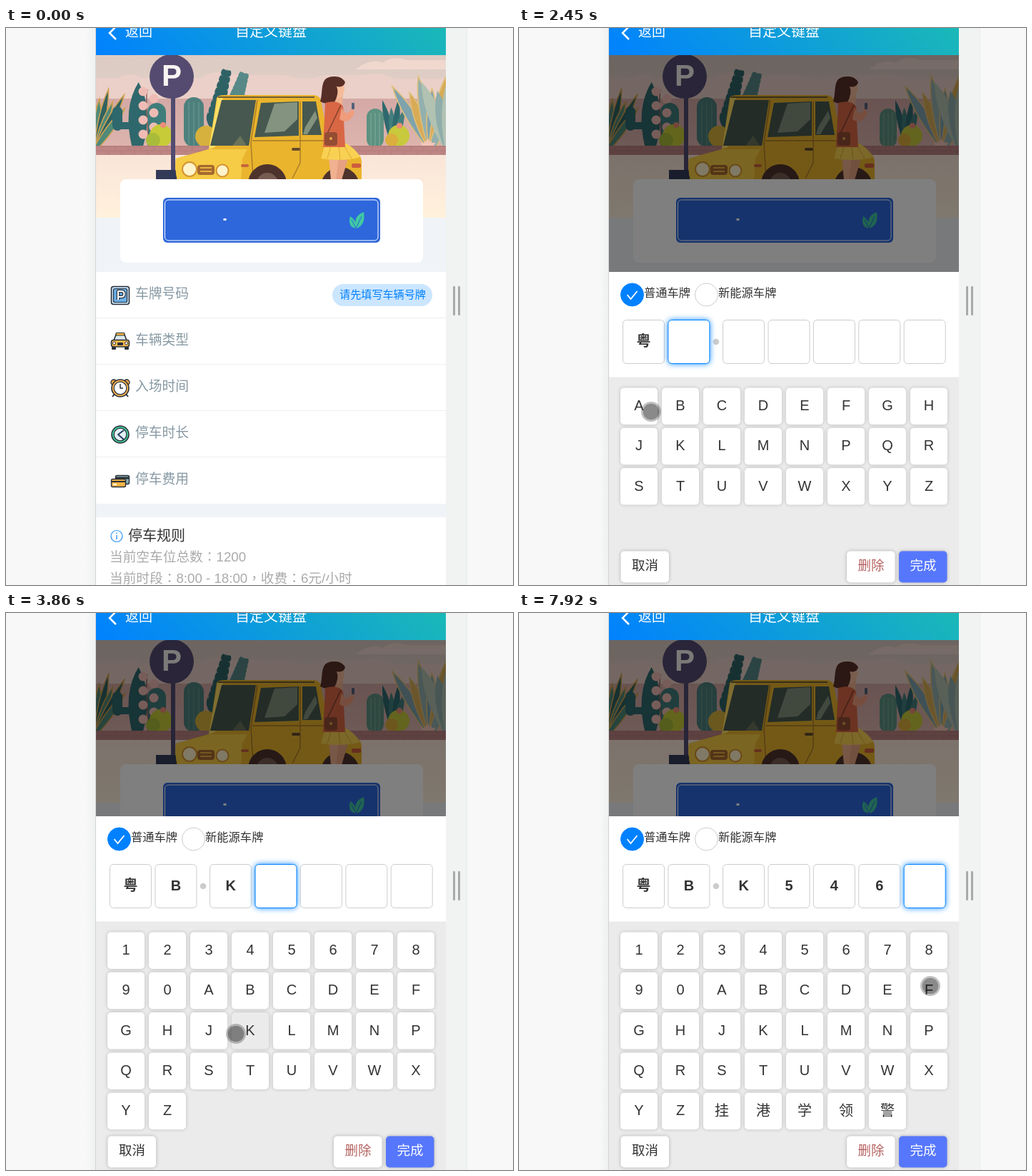
An HTML page with a canvas for the animation above (8 s loop, 710 by 781 pixels).

```html
<!DOCTYPE html>
<html lang="zh">
<head>
<meta charset="utf-8">
<title>自定义键盘</title>
<style>
html, body { margin: 0; width: 100%; height: 100%; overflow: hidden; background: #f8f8f8; }
canvas { display: block; }
</style>
</head>
<body>
<canvas id="stage" width="710" height="781"></canvas>
<script>
const W = 710, H = 781, LOOP = 8000;
const FONT = '"Liberation Sans", "Noto Sans CJK SC", "Noto Sans CJK", sans-serif';
// Sets full-width punctuation in the middle of its cell.
const CENTERED = '"Liberation Sans", "Noto Sans CJK TC", "Noto Sans CJK", sans-serif';
const BLUE = '#0081ff', INK = '#333', DARK = '#2b3038';
const view = document.getElementById('stage').getContext('2d');
let g = view;

// ---------- drawing helpers ----------
function box(x, y, w, h, r, fill, stroke, lw = 1) {
  g.beginPath();
  g.roundRect(x, y, w, h, r);
  paint(fill, stroke, lw);
}
function disc(x, y, r, fill, stroke, lw = 1) {
  g.beginPath();
  g.arc(x, y, r, 0, Math.PI * 2);
  paint(fill, stroke, lw);
}
function paint(fill, stroke, lw) {
  if (fill) { g.fillStyle = fill; g.fill(); }
  if (stroke) { g.strokeStyle = stroke; g.lineWidth = lw; g.stroke(); }
}
function shape(d, fill, stroke, lw = 1) {
  const p = new Path2D(d);
  if (fill) { g.fillStyle = fill; g.fill(p); }
  if (stroke) { g.strokeStyle = stroke; g.lineWidth = lw; g.stroke(p); }
}
function text(s, x, y, size, fill, align = 'left', weight = '', family = FONT) {
  g.font = `${weight} ${size}px ${family}`;
  g.textAlign = align;
  g.textBaseline = 'middle';
  g.fillStyle = fill;
  g.fillText(s, x, y);
}
function shaded(blur, color, draw) {
  g.save();
  g.shadowBlur = blur;
  g.shadowColor = color;
  draw();
  g.restore();
}
function gradient(x0, y0, x1, y1, ...colors) {
  const gr = g.createLinearGradient(x0, y0, x1, y1);
  colors.forEach((c, i) => gr.addColorStop(i / (colors.length - 1), c));
  return gr;
}
function layer() {
  const c = document.createElement('canvas');
  c.width = W;
  c.height = H;
  return c.getContext('2d');
}
function blade(x, y, len, deg, w, fill, edge) {
  g.save();
  g.translate(x, y);
  g.rotate(deg * Math.PI / 180);
  shape(`M${-w / 3} 0Q${-w} ${-len * .6} 0 ${-len}Q${w} ${-len * .6} ${w / 3} 0Z`, fill, edge, 1.6);
  g.restore();
}
function fan(x, y, n, from, to, len, w, fills, edge) {
  for (let i = 0; i < n; i++)
    blade(x, y, len * (1 - .18 * (i % 2)), from + (to - from) * i / (n - 1), w, fills[i % fills.length], edge);
}
function frond(x, y, len, deg, fill) {
  g.save();
  g.translate(x, y);
  g.rotate(deg * Math.PI / 180);
  for (let i = 0; i < 8; i++) {
    const at = -len * (.2 + i * .1), l = 22 - i * 1.6;
    blade(0, at, l, -32, 8, fill);
    blade(0, at, l, 32, 8, fill);
  }
  blade(0, 0, len, 0, 8, fill);
  g.restore();
}

// ---------- page ----------
function plants() {
  fan(126, 168, 6, -4, 36, 84, 8, ['#2f6263', '#4f8a78'], '#d0a252');
  blade(184, 168, 92, 1, 22, '#2f686c');
  box(149, 110, 14, 34, 7, '#2e686d');
  box(152, 132, 26, 10, 5, '#2e686d');
  box(198, 105, 26, 64, 13, '#3f7d7b');
  shape('M198 86C194 110 200 140 199 165', null, '#8b5d57', 1.5);
  for (let i = 0; i < 7; i++) disc(200 + (i % 2 ? 7 : -8), 89 + i * 10, 6.5, '#efbcb5');
  disc(217, 151, 16, '#c7cb38');
  disc(206, 157, 10, '#a9bc39');
  disc(220, 136, 4, '#ee8d78');
  box(249, 97, 28, 70, 14, '#4d807d');
  for (let x = 256; x < 275; x += 7) shape(`M${x} 104V165`, null, '#6f9a90');
  frond(284, 160, 106, 14, '#2f6265');
  frond(309, 140, 80, 18, '#568987');
  disc(280, 152, 15, '#d6b13d');
  box(505, 113, 24, 55, 12, '#5c9182');
  for (let x = 511; x < 527; x += 6) shape(`M${x} 119V165`, null, '#82ac97');
  fan(543, 165, 4, -14, 16, 66, 8, ['#2e696e', '#437f7c']);
  fan(596, 170, 6, -32, 22, 104, 12, ['#7fa3ad', '#d8ab55', '#93b0ae'], '#e0bf7c');
  fan(620, 170, 3, -22, 0, 102, 16, ['#b1c2b2', '#8fadaa']);
  disc(550, 151, 15, '#c8c93d');
  disc(540, 157, 9, '#dcae3d');
  disc(551, 137, 4, '#ec8d76');
  fan(591, 167, 5, -60, 60, 12, 4, ['#f3c5b8']);
}
function car() {
  shape('M238 183L284 170 295 98Q297 94 306 94H430Q439 94 441 102L452 158 494 178Q498 180 498 190V214H240Q236 197 238 183Z', '#eab42d');
  shape('M238 183L284 170H338L331 183 329 214H240Q236 197 238 183Z', '#f6cb45');
  shape('M284 170L296 98 304 97 293 167Z', '#ffdd65');
  shape('M302 101H350L340 165H286Z', '#46584f');
  shape('M317 165L328 151 337 165Z', '#6b735a');
  shape('M357 105L410 103V151L348 153Z', '#46584f');
  shape('M415 103H434L442 150H415Z', '#46584f');
  shape('M376 106L408 104V128L390 145 362 147Z', '#84937f');
  shape('M419 139L433 116 436 126 422 149H416Z', '#84937f');
  shape('M352 101L343 160 346 212M412 103V189L401 211M345 158H452M452 158L457 188', null, '#a87928', 1.4);
  shape('M297 97H432', null, '#705f35', 2);
  box(400, 168, 12, 4, 2, '#654a2b');
  box(329, 191, 11, 4, 2, '#c8653c');
  disc(257, 198, 10, '#fff3cb', '#d59330', 2);
  disc(303, 200, 8.5, '#fff3cb', '#d59330', 2);
  box(268, 192, 24, 14, 4, '#a5692f');
  shape('M272 196H288M272 201H288', null, '#e8b245', 2);
  disc(366, 218, 27, '#4e332c');
  disc(366, 218, 15, '#765c50');
  disc(468, 222, 27, '#4e332c');
  box(484, 190, 13, 6, 2, '#cd5c3c');
}
function woman() {
  shape('M452 180H470L466 213H455Z', '#f0b190');
  shape('M466 180H480L470 213H462Z', '#e5a181');
  shape('M447 162H477Q491 171 496 181Q473 188 441 183Z', '#f9d152');
  shape('M455 166L450 183M466 166L468 185M474 166L484 183', null, '#dba93c');
  shape('M461 90H472L471 108H458Z', '#efb28f');
  shape('M456 71Q473 68 474 85Q473 98 464 99L454 94Z', '#f5bc99');
  shape('M459 68C438 68 445 88 440 103Q450 109 460 104Q467 91 463 82Q473 84 475 76Q470 67 459 68Z', '#572e26');
  shape('M447 105Q465 100 472 110L475 167H444Z', '#d96745');
  shape('M470 112Q476 126 485 113L488 119Q480 137 467 128Z', '#ef9d7c');
  box(484, 105, 4, 9, 1, '#54617a');
  shape('M469 108L447 154', null, '#81402e', 1.5);
  box(446, 146, 18, 19, 4, '#944d34');
  disc(455, 155, 2, '#e6ac4c');
}
function hero() {
  g.save();
  g.beginPath();
  g.rect(126, 38, 490, 228);
  g.clip();
  box(126, 38, 490, 70, 0, gradient(0, 38, 0, 108, '#dbcbc3', '#e4d0c8'));
  shape('M126 70H158Q174 60 190 70H272Q294 56 322 66H392Q420 76 446 66H500Q525 60 543 71H616V102H126Z', '#ead0c8');
  shape('M490 58Q510 42 528 49Q540 38 562 45H616V58Z', '#f0d8cf');
  box(126, 99, 490, 67, 0, gradient(0, 99, 0, 166, '#d4a9a6', '#dcb4ad'));
  plants();
  box(126, 165, 490, 14, 0, '#bd8583');
  shape('M126 166H616M126 172H616', null, '#b47a79');
  for (let x = 135; x < 616; x += 18) shape(`M${x} 166V172M${x + 9} 172V178`, null, '#b47a79');
  box(126, 178, 490, 88, 0, gradient(0, 178, 0, 266, '#f9e5d8', '#fff1dc'));
  box(231, 90, 6, 112, 0, '#514b70');
  shape('M210 199H238L245 212H210Z', '#333a58');
  disc(232, 68, 31, '#554b70');
  text('P', 232, 69, 42, '#f8f5f2', 'center', 'bold');
  car();
  woman();
  g.restore();
}
function clock(y, face, rim) {
  disc(160, y, 12, rim, DARK, 1.6);
  disc(160, y, 8.8, face, DARK, 1.2);
}
function icons() {
  box(147.5, 362.5, 25, 25, 3, '#c7e1f5', DARK, 1.6);
  box(150.5, 365.5, 19, 19, 2, '#6aafe9', DARK, 1.2);
  g.lineJoin = 'round';
  shape('M157 381V369H161.5Q165.5 369 165.5 373T161.5 377H157', null, DARK, 4.6);
  shape('M157 381V369H161.5Q165.5 369 165.5 373T161.5 377H157', null, '#fff', 2.2);

  shape('M151 438L154 430H166L169 438Z', '#dbe8ec', DARK, 1.6);
  box(154, 427.5, 12, 3.5, 1, '#f7b740', DARK, 1.2);
  box(147.5, 437.5, 25, 9.5, 3, '#f7bb4c', DARK, 1.6);
  box(148, 447, 6, 4, 1, DARK);
  box(166, 447, 6, 4, 1, DARK);
  disc(151.5, 442, 2, '#fff', DARK);
  disc(168.5, 442, 2, '#fff', DARK);
  box(156, 441, 8, 4, 1, DARK);

  disc(151, 497, 4, '#f3a748', DARK, 1.4);
  disc(169, 497, 4, '#f3a748', DARK, 1.4);
  shape('M153 512L149 517M167 512L171 517', null, DARK, 2);
  clock(505, '#fff', '#f6b552');
  shape('M160 499V505H164', null, DARK, 1.5);

  clock(570, '#e4f1f6', '#42c79c');
  shape('M165 564L157 570L165 577', null, '#263c5c', 2);

  box(153.5, 627.5, 19, 12, 2, '#8ab0b7', DARK, 1.4);
  shape('M154 631H172', null, DARK, 3);
  box(147.5, 632.5, 20, 11, 2, '#f3b646', DARK, 1.4);
  shape('M148 636H167', null, DARK, 2);
  box(150, 639, 5, 2, 0, '#fff');
}
function page() {
  box(0, 0, W, H, 0, '#f8f8f8');
  box(112, 0, 13, H, 0, gradient(112, 0, 125, 0, '#f8f8f8', '#eef1f1'));
  box(125, 0, 1, H, 0, '#d2d5d5');
  box(616, 0, 29, H, 0, '#f1f3f3');
  box(645, 0, 1, H, 0, '#eaecec');
  box(626, 362, 3, 41, 1, '#a9a9a9');
  box(633, 362, 3, 41, 1, '#a9a9a9');
  box(126, 0, 490, H, 0, '#f0f4f8');
  box(126, 0, 490, 38, 0, gradient(233, 144.5, 509, -131.5, BLUE, '#1cbbb4'));
  shape('M154 -2L145 7L154 16', null, '#fff', 2.5);
  text('返回', 167, 7, 19, '#fff');
  text('自定义键盘', 371, 6, 20, '#fff', 'center');
  hero();

  box(160, 212, 424, 117, 8, '#fff');
  box(220, 238, 304, 63, 6, '#2d67db');
  box(222.5, 241, 298.5, 57, 5, null, '#fff');
  box(304.5, 267, 4, 3, 0, '#fff');
  shape('M490 281Q478 279 482 264Q492 270 490 281ZM491 281Q485 264 501 258Q504 276 491 281Z', '#40c9a3');
  shape('M484 269L490 281L498 264', null, '#2d67db');

  box(126, 342, 490, 325, 0, '#fff');
  ['车牌号码', '车辆类型', '入场时间', '停车时长', '停车费用'].forEach((s, i) => {
    text(s, 181, 373.5 + i * 65, 18.75, '#8799a3');
    if (i) box(126, 341 + i * 65, 490, 1, 0, '#eeeff0');
  });
  icons();
  box(457, 359, 140, 31, 15.5, '#cce6ff');
  text('请先填写车辆号牌', 527.5, 375, 15.1, BLUE, 'center');

  box(126, 686, 490, 95, 0, '#fff');
  disc(155, 712.5, 8, null, '#2c92f5', 1.2);
  box(154.3, 711, 1.4, 6, 0, '#2c92f5');
  box(154.3, 707.5, 1.4, 1.8, 0, '#2c92f5');
  text('停车规则', 171, 713, 20, INK);
  ['当前空车位总数：1200', '当前时段：8:00 - 18:00，收费：6元/小时'].forEach((s, i) =>
    text(s, 145, 742.5 + i * 30, 18.7, '#aaa', 'left', '', CENTERED));
}

// ---------- keyboard panel ----------
const PROVINCES = '粤京冀沪津晋蒙辽吉黑苏浙皖闽赣鲁豫鄂湘桂琼渝川贵云藏陕甘青宁新';
const LETTERS = 'ABCDEFGHJKLMNPQRSTUVWXYZ';
const DIGITS = '1234567890';
const ENTRIES = [[2450, '粤'], [3220, 'B'], [3840, 'K'], [5100, '5'], [5420, '4'], [5970, '6']];

function keysFor(count) {
  if (count === 0) return PROVINCES;
  if (count === 1) return LETTERS;
  return DIGITS + LETTERS + (count > 5 ? '挂港学领警' : '');
}
function radio(x, y, on, label) {
  disc(x, y, 16, on ? BLUE : '#fff', on ? BLUE : '#ccc');
  if (on) shape(`M${x - 7} ${y}l5 6l9 -11`, null, '#fff', 1.8);
  text(label, x + 16.5, y - 1, 16.3, INK);
}
function button(x, label, fill, color) {
  shaded(5, 'rgba(0,0,0,.25)', () => box(x, 733.5, 67.5, 44, 5, fill));
  text(label, x + 34, 755, 18.5, color, 'center');
}
function panel(t, top) {
  const typed = ENTRIES.filter(e => t >= e[0]);
  const n = typed.length;
  box(126, top, 490, 789 - top, 0, '#ebebeb');
  box(126, top, 490, 147.5, 0, '#fff');
  radio(158.5, top + 32, true, '普通车牌');
  radio(262.5, top + 32, false, '新能源车牌');

  disc(276, top + 98, 4.3, '#ccc');
  for (let i = 0; i < 7; i++) {
    const x = 145.5 + i * 63.4 + (i > 1 ? 13.3 : 0), y = top + 67.5;
    if (i === n) shaded(9, BLUE, () => box(x, y, 58, 61, 5, '#fff'));
    box(x, y, 58, 61, 5, '#fff', i === n ? BLUE : '#ccc');
    if (i < n) text(typed[i][1], x + 29, y + 31, 20, INK, 'center', 'bold');
  }

  const last = typed[n - 1];
  const pressed = last && t - last[0] < 165 ? last[1] : '';
  [...keysFor(n)].forEach((k, i) => {
    const x = 142 + i % 8 * 58, y = top + 162.5 + Math.floor(i / 8) * 56.3;
    shaded(5, 'rgba(0,0,0,.2)', () => box(x, y, 52, 51.5, 5, k === pressed ? '#ebebeb' : '#fff'));
    text(k, x + 26, y + (k > 'z' ? 27 : 26), 20, INK, 'center');
  });
  button(142.5, '取消', '#fff', INK);
  button(459, '删除', '#fff', n ? '#b5615f' : '#888');
  button(532, '完成', '#5677fc', '#fff');
}

// ---------- timing ----------
const BURSTS = [[70, 210, 3], [440, 830, 6], [980, 1220, 4], [1380, 1990, 9], [2450, 3080, 9],
  [3220, 4010, 11], [4090, 4560, 7], [4720, 4870, 3], [5100, 5270, 3], [5420, 6210, 11],
  [6270, 6360, 2], [6520, 7280, 11], [7360, 7920, 8]];
function held(t) {
  let q = 0;
  for (const [a, b, n] of BURSTS) {
    if (t < a) break;
    const step = (b - a) / (n - 1);
    q = a + step * Math.min(n - 1, Math.floor((t - a) / step + 1e-6));
  }
  return q;
}

// Pointer path: time, x, y.
const PATH = `70 556 743,140 440 570,210 388 486,370 388 486,830 327 272,1300 327 272,1760 190 567,
1990 185 538,2530 185 538,2900 226 538,3080 228 538,3220 230 545,3299 234 608,3690 322 590,
3852 322 590,4010 345 574,4560 454 503,4640 454 503,4870 407 487,5100 407 487,5270 351 482,
5420 359 480,5900 455 482,6052 458 480,6210 533 475,6440 540 475,6650 531 520,7280 570 757,
7320 568 755,7800 568 545,7920 576 523`.split(',').map(s => s.trim().split(' ').map(Number));
function pointer(t) {
  if (t < PATH[0][0]) return;
  let i = PATH.findIndex(p => p[0] >= t);
  if (i < 0) i = PATH.length - 1;
  const b = PATH[i], a = PATH[Math.max(0, i - 1)];
  const k = b === a ? 1 : Math.min(1, (t - a[0]) / (b[0] - a[0]));
  const x = a[1] + (b[1] - a[1]) * k, y = a[2] + (b[2] - a[2]) * k;
  disc(x, y, 12.6, null, 'rgba(64,64,64,.33)', 2.8);
  disc(x, y, 11.3, 'rgba(0,0,0,.46)');
}
function smooth(k) {
  k = Math.min(1, Math.max(0, k));
  return k * k * (3 - 2 * k);
}

const backdrop = layer(), sheet = layer();
g = backdrop;
page();

// Draws the panel on its own layer, so that it fades as one piece.
function popup(t) {
  const open = Math.min(1, (t - 980) / 240);
  const scale = 1 - .2 * (1 - open) ** 2;
  g = sheet;
  g.clearRect(0, 0, W, H);
  g.save();
  g.translate(371, 565.5);
  g.scale(scale, scale);
  g.translate(-371, -565.5);
  panel(t, 342 - 57 * smooth((t - 3222) / 300));
  g.restore();
  g = view;
  g.globalAlpha = Math.min(1, .79 + open * .4);
  g.drawImage(sheet.canvas, 0, 0);
  g.globalAlpha = 1;
}

function frame() {
  const t = held(performance.now() % LOOP);
  g = view;
  g.drawImage(backdrop.canvas, 0, 0);
  if (t >= 980) {
    box(126, 38, 490, H - 38, 0, 'rgba(0,0,0,.5)');
    popup(t);
  }
  pointer(t);
  requestAnimationFrame(frame);
}
frame();
</script>
</body>
</html>
```
